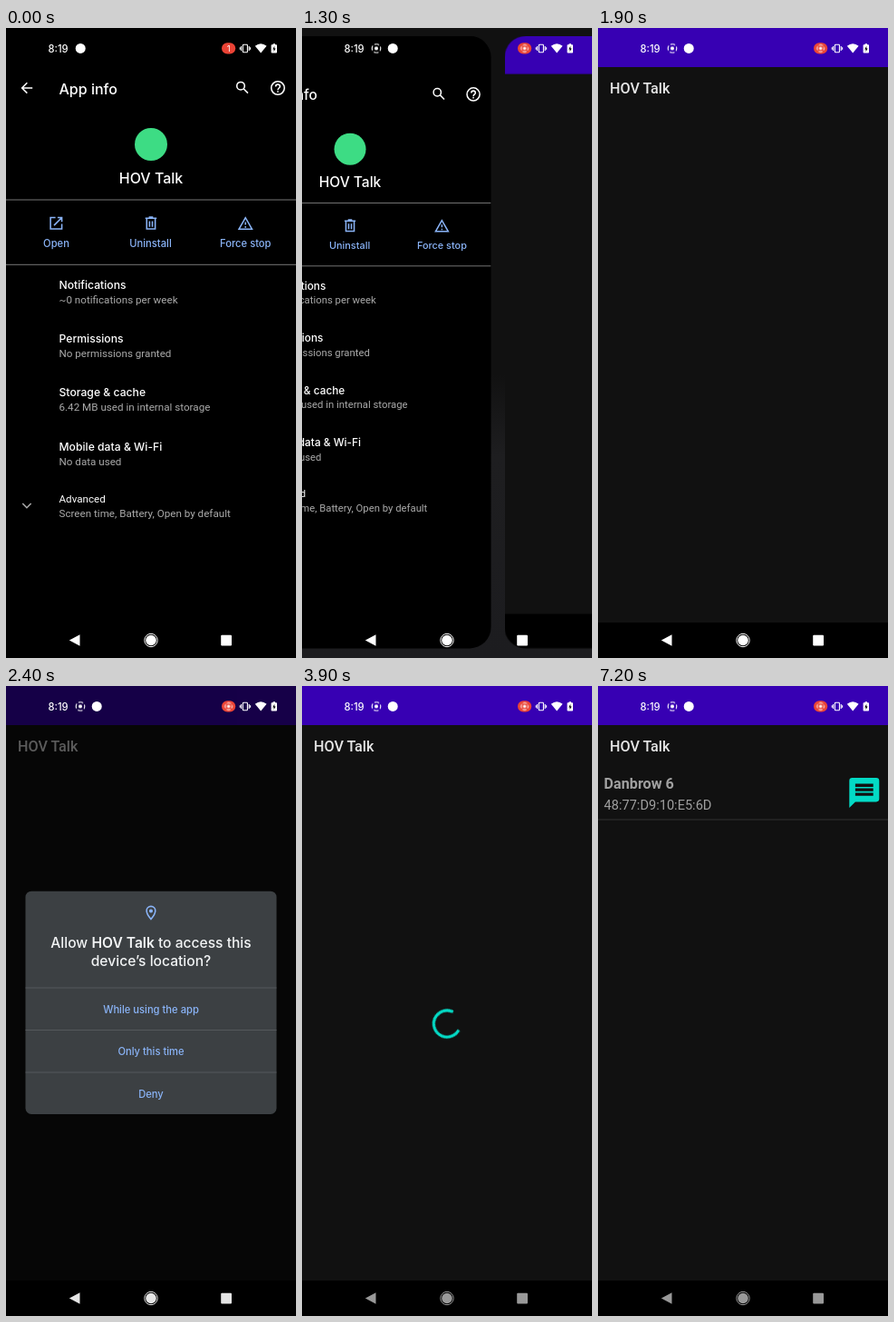
Animation of 320x693 px, one loop 8000 ms. Source, as an HTML page:

```html
<!DOCTYPE html>
<html lang="en">
<head>
<meta charset="utf-8">
<title>Location permission flow</title>
<style>
@property --from { syntax: '<length>'; inherits: false; initial-value: 0px; }
@property --to { syntax: '<length>'; inherits: false; initial-value: 0px; }

html, body { margin: 0; width: 100%; height: 100%; overflow: hidden; background: #000; }
.stage { position: relative; width: 320px; height: 693px; overflow: hidden;
  background: linear-gradient(#111 0 55%, #1e1e20 68%, #1c1c1f); }
.stage > * { position: absolute; inset: 0; }
svg { display: block; width: 320px; height: 693px; }
.card { overflow: hidden; transform-origin: 0 0; }
.settings { background: #000; }
.app { background: #111; }

text { font-family: Inter, sans-serif; fill: #fff; }
.roboto { font-family: Roboto, sans-serif; }
.mid { text-anchor: middle; }
.head { font-size: 12.2px; font-weight: 450; }
.sub { font: 11.65px Roboto, sans-serif; fill: #aaa; }
.link { font-size: 11.2px; font-weight: 500; fill: #8ab4f8; text-anchor: middle; }
.ask { font-size: 15.6px; font-weight: 500; fill: #f1f3f4; text-anchor: middle; }
.icon { fill: none; stroke: #fff; stroke-width: 2; }
.blue { stroke: #8ab4f8; }
.white { fill: #fff; }

.settings, .app, .scrim, .dialog, .title, .item, .nav, .spinner, .turn,
.count, .rec, .badge { animation: 8s linear infinite; }
.settings { animation-name: settings; }
.app { animation-name: app; }
.title { animation-name: title; }
.scrim { animation-name: scrim; }
.dialog { animation-name: dialog; }
.item { animation-name: item; }
.nav { animation-name: dim; }
.spinner { animation-name: spinner; }
.turn { animation-name: turn; }
.count { animation-name: count; }
.rec { animation-name: rec; }
.badge { animation-name: badge; }

@keyframes settings {
  0%, 11.25% { transform: none; border-radius: 0; animation-timing-function: ease-out; }
  13.75% { transform: translate(4.5px, 8.8px) scale(.972); border-radius: 24px; animation-timing-function: ease-in; }
  16.25% { transform: translate(-100.6px, 8.8px) scale(.972); border-radius: 24px; animation-timing-function: ease-out; }
  18.75%, 100% { transform: translate(-321.5px, 8.8px) scale(.972); border-radius: 24px; }
}
@keyframes app {
  0%, 11.25% { transform: translate(336px, 0); border-radius: 24px; animation-timing-function: ease-out; }
  13.75% { transform: translate(330.5px, 8.8px) scale(.972); border-radius: 24px; animation-timing-function: ease-in; }
  16.25% { transform: translate(225.4px, 8.8px) scale(.972); border-radius: 24px; animation-timing-function: ease-out; }
  18.75% { transform: translate(4.5px, 8.8px) scale(.972); border-radius: 26px; }
  20% { transform: translate(4px, 7.5px) scale(.978); border-radius: 26px; }
  22.5%, 100% { transform: none; border-radius: 0; }
}
@keyframes title { 0%, 22.5% { opacity: 0; } 23.75%, 100% { opacity: 1; } }
@keyframes scrim { 0%, 25% { opacity: 0; } 27.5%, 37.5% { opacity: .6; } 40%, 100% { opacity: 0; } }
@keyframes dialog { 0%, 25.6% { opacity: 0; } 28.1%, 37.5% { opacity: 1; } 40%, 100% { opacity: 0; } }
@keyframes item { 0%, 83.74% { opacity: 0; } 83.75%, 100% { opacity: 1; } }
@keyframes dim { 0%, 26.25% { opacity: 1; } 41.25%, 100% { opacity: .6; } }
@keyframes count { 0%, 1.25% { opacity: 1; } 3.75%, 100% { opacity: 0; } }
@keyframes rec { 0%, 2.5% { opacity: 0; } 5%, 100% { opacity: 1; } }
@keyframes badge {
  0%, 1.25% { transform: translate(-18px); animation-timing-function: ease-out; }
  5%, 100% { transform: none; }
}

/* Ring: a slow turn, a quarter-turn drift per cycle, and a growing then shrinking arc */
@keyframes spinner { 0%, 41.99% { opacity: 0; } 42%, 83.74% { opacity: 1; } 83.75%, 100% { opacity: 0; } }
@keyframes turn { from { transform: rotate(-544deg); } to { transform: rotate(752deg); } }
@keyframes drift { to { transform: rotate(90deg); } }
@keyframes tail {
  0%, 50% { --from: 0px; animation-timing-function: cubic-bezier(.4, 0, .2, 1); }
  100% { --from: 75px; }
}
@keyframes tip {
  0% { --to: 0px; animation-timing-function: cubic-bezier(.4, 0, .2, 1.04); }
  50% { --to: 72px; animation-timing-function: cubic-bezier(.933, 0, .987, 1); }
  100% { --to: 75px; }
}
.arc { fill: none; stroke: #03dac5; stroke-width: 3.2; stroke-linecap: square;
  stroke-dasharray: calc(var(--to) - var(--from) + .01px) 200px;
  stroke-dashoffset: calc(0px - var(--from));
  animation: drift calc(8s / 6) -640ms linear infinite,
    tail calc(8s / 6) -640ms linear infinite, tip calc(8s / 6) -640ms linear infinite; }
</style>
</head>
<body>
<div class="stage">
  <div class="card settings">
    <svg viewBox="0 0 320 693">
      <g class="icon">
        <path transform="translate(13.6 56.6) scale(.78)" d="M20 12H5M12.5 4.7L5.2 12l7.3 7.3"/>
        <g transform="translate(251.6 56.3) scale(.78)"><circle cx="9.5" cy="9.5" r="5.5"/><path d="M13.7 13.7l6 6"/></g>
        <g transform="translate(290.6 56.6) scale(.78)"><circle cx="12" cy="12" r="9.3"/><path d="M9 10c0-4 6-4 6 0 0 2-3 2.2-3 5M12 16.2v2"/></g>
        <path transform="translate(13.6 516) scale(.78)" stroke="#aaa" d="M6 9l6 6 6-6"/>
      </g>
      <text x="58.5" y="72.5" font-size="16" font-weight="500">App info</text>
      <circle cx="160" cy="128" r="18" fill="#3ddc84"/>
      <text class="mid" x="160" y="171" font-size="16" font-weight="500">HOV Talk</text>
      <path d="M0 189h320M0 260.3h320" stroke="#777"/>
      <g class="icon blue">
        <path transform="translate(46 205.4) scale(.78)" d="M11 4H4v16h16v-7M14 4h6v6M20 4L9 15"/>
        <path transform="translate(150.6 205.4) scale(.78)" d="M6 6v14h12V6M4 5h16M9 3.5h6M10 9v8M14 9v8"/>
        <path transform="translate(254.9 205.6) scale(.78)" d="M12 4L2.8 20h18.4zM12 10v4M12 16v2"/>
      </g>
      <text class="link" x="55.5" y="240.5">Open</text>
      <text class="link" x="159.5" y="240.5">Uninstall</text>
      <text class="link" x="264.3" y="240.5">Force stop</text>
      <g class="head">
        <text x="58.5" y="287">Notifications</text>
        <text x="58.5" y="346">Permissions</text>
        <text x="58.5" y="405.3">Storage &amp; cache</text>
        <text x="58.5" y="464.5">Mobile data &amp; Wi-Fi</text>
        <text class="roboto" x="58.5" y="522" font-size="11.65" font-weight="400">Advanced</text>
      </g>
      <text class="sub" x="58.5" y="303">~0 notifications per week</text>
      <text class="sub" x="58.5" y="362">No permissions granted</text>
      <text class="sub" x="58.5" y="421.3">6.42 MB used in internal storage</text>
      <text class="sub" x="58.5" y="480.5">No data used</text>
      <text class="sub" x="58.5" y="538">Screen time, Battery, Open by default</text>
    </svg>
  </div>

  <div class="card app">
    <svg viewBox="0 0 320 693">
      <path fill="#3700b3" d="M0 0h320v43H0z"/>
      <path d="M0 654h320v39H0z"/>
      <text class="title roboto" x="13" y="72.3" font-size="16.2" font-weight="500" style="fill:#e6e6e6">HOV Talk</text>
      <g class="item">
        <text class="roboto" x="6.5" y="112.5" font-size="16.2" font-weight="700" style="fill:#a0a0a0">Danbrow 6</text>
        <text class="roboto" x="6.5" y="136" font-size="14.6" style="fill:#a0a0a0">48:77:D9:10:E5:6D</text>
        <path d="M0 147h320" stroke="#333"/>
        <path fill="#03dac5" fill-rule="evenodd" transform="translate(274 97.7) scale(1.65)"
          d="M20 2H4a2 2 0 0 0-2 2v18l4-4h14a2 2 0 0 0 2-2V4a2 2 0 0 0-2-2zM6 6h12v2H6zM6 9h12v2H6zM6 12h12v2H6z"/>
      </g>
      <g class="spinner">
        <g transform="translate(160 371.5)">
          <g class="turn"><path class="arc" pathLength="100" d="M0-14.6a14.6 14.6 0 0 1 0 29.2a14.6 14.6 0 0 1 0-29.2"/></g>
        </g>
      </g>
      <path class="scrim" d="M0 0h320v693H0z"/>
      <g class="dialog">
        <rect x="21.5" y="225.7" width="277" height="245.3" rx="6.5" fill="#3c4043"/>
        <g transform="translate(150.6 240.4) scale(.78)">
          <path class="icon blue" d="M12 2.5c-3.6 0-6.2 2.8-6.2 6.3 0 4.7 6.2 11.9 6.2 11.9s6.2-7.2 6.2-11.9c0-3.5-2.6-6.3-6.2-6.3z"/>
          <circle cx="12" cy="9" r="2.6" fill="#8ab4f8"/>
        </g>
        <text class="ask" x="160" y="287.5">Allow <tspan font-weight="600">HOV Talk</tspan> to access this</text>
        <text class="ask" x="160" y="307.5">device’s location?</text>
        <path d="M21.5 332h277M21.5 378.5h277M21.5 425h277" stroke="#55595c"/>
        <text class="link" x="160" y="360">While using the app</text>
        <text class="link" x="160" y="406.3">Only this time</text>
        <text class="link" x="160" y="452.8">Deny</text>
      </g>
    </svg>
  </div>

  <svg viewBox="0 0 320 693">
    <text x="46.5" y="26.6" font-size="11.2" font-weight="500">8:19</text>
    <g class="rec" transform="translate(82 22.4)">
      <circle class="icon" r="4.8" style="stroke-width:1.1" stroke-dasharray="5.5 2.04" stroke-dashoffset="2.7"/>
      <circle class="white" r="2.1"/>
    </g>
    <circle class="badge white" cx="100.2" cy="22.4" r="5.5"/>
    <rect x="238" y="16.2" width="15.2" height="12.4" rx="6.2" fill="#ea4335"/>
    <text class="count mid" x="245.6" y="26" font-size="9.5">1</text>
    <g class="rec" transform="translate(245.6 22.4)">
      <circle class="icon" r="3.9" style="stroke-width:1" stroke-dasharray="4.5 1.63" stroke-dashoffset="2.2"/>
      <circle class="white" r="1.8"/>
    </g>
    <g class="icon" style="stroke-width:1.1">
      <rect x="261.4" y="18.3" width="5" height="8.4" rx=".8"/>
      <path d="M259.6 20v5M268.2 20v5M258.2 21.3v2.4M269.6 21.3v2.4"/>
    </g>
    <path class="white" d="M274.8 19.7q6.4-5 12.8 0L281.2 27.6z"/>
    <path class="white" d="M294.6 17.2h2.4v1h1.2q.8 0 .8.8v7.8q0 .8-.8.8h-4.8q-.8 0-.8-.8V19q0-.8.8-.8h1.2z"/>
    <path d="M296.3 19.8l-2 3.6h1.3v2.6l2-3.6h-1.3z"/>
    <g class="nav">
      <path class="white" d="M69.8 673.5l11.7-6.2v12.4z"/>
      <circle class="icon" cx="160" cy="673.5" r="7.2" style="stroke-width:1"/>
      <circle class="white" cx="160" cy="673.5" r="5.8"/>
      <rect class="white" x="237.2" y="667.7" width="11.8" height="11.8" rx="1"/>
    </g>
  </svg>
</div>
</body>
</html>
```
